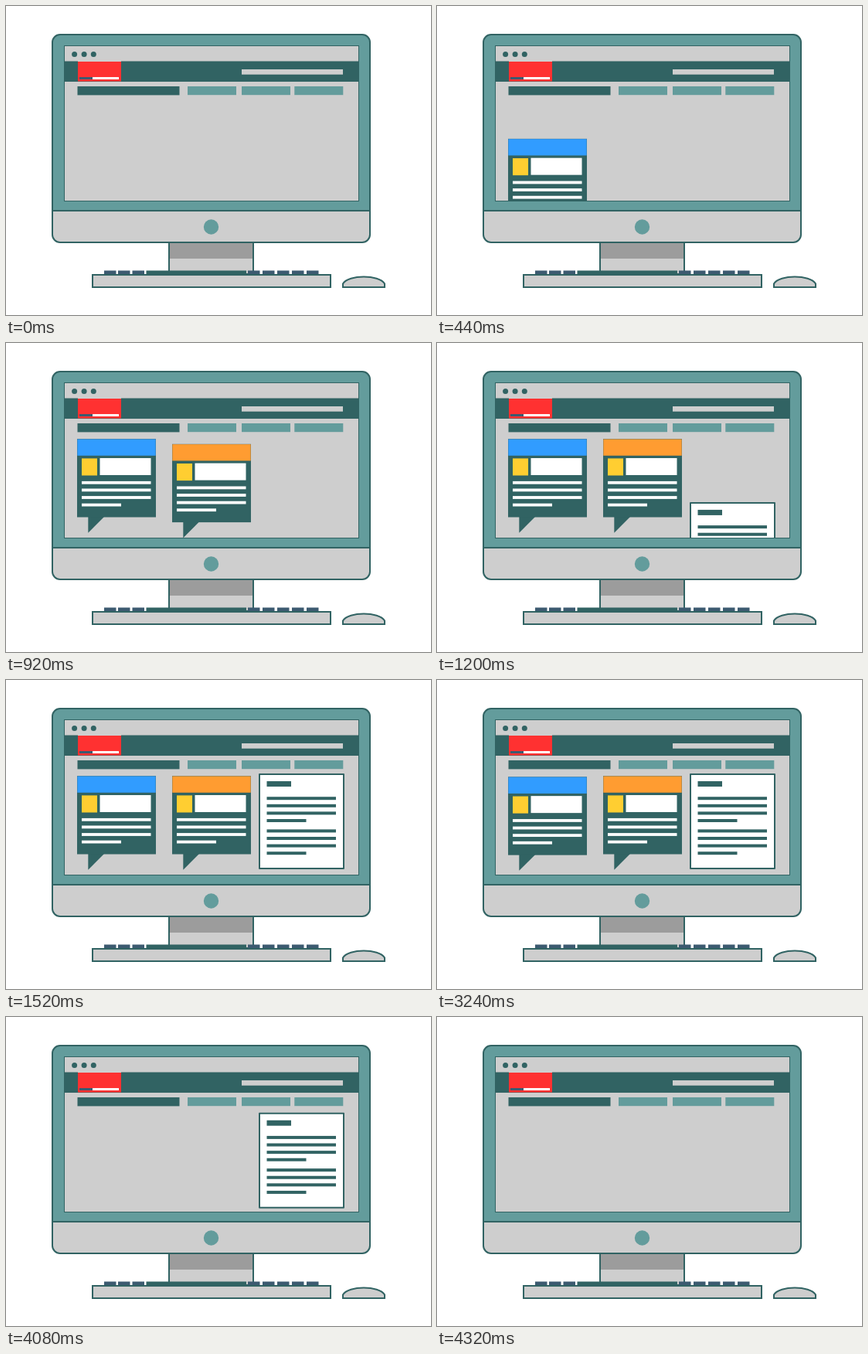
Write an HTML page with a canvas that moves like this. It is 550x400 px and loops after 4.8 s.

```html
<!DOCTYPE html>
<html lang="en">
<head>
<meta charset="utf-8">
<title>Web page on a desktop computer</title>
<style>
  html, body { margin: 0; width: 100%; height: 100%; overflow: hidden; background: #fff; }
  canvas { display: block; width: 550px; height: 400px; }
</style>
</head>
<body>
<canvas id="stage" width="550" height="400"></canvas>
<script>
const ctx = document.getElementById('stage').getContext('2d');

const DARK = '#316363', TEAL = '#639c9c', LIGHT = '#cecece', GREY = '#9c9c9c';
const RED = '#ff3131', BLUE = '#319cff', ORANGE = '#ff9c31', YELLOW = '#ffce31';
const SLATE = '#3c5a70', WHITE = '#fff';

const LOOP = 4800, STEP = 40, MOVE = 400;
const ENTER = 320, LEAVE = 3200;

// Corner-to-corner rectangle
function rect(x1, y1, x2, y2, fill) {
  ctx.fillStyle = fill;
  ctx.fillRect(x1, y1, x2 - x1, y2 - y1);
}

function outline(x1, y1, x2, y2, width = 2) {
  ctx.strokeStyle = DARK;
  ctx.lineWidth = width;
  ctx.strokeRect(x1, y1, x2 - x1, y2 - y1);
}

function disc(x, y, r, fill) {
  ctx.fillStyle = fill;
  ctx.beginPath();
  ctx.arc(x, y, r, 0, Math.PI * 2);
  ctx.fill();
}

function roundedPath(x1, y1, x2, y2, r) {
  ctx.beginPath();
  ctx.moveTo(x1 + r, y1);
  ctx.arcTo(x2, y1, x2, y2, r);
  ctx.arcTo(x2, y2, x1, y2, r);
  ctx.arcTo(x1, y2, x1, y1, r);
  ctx.arcTo(x1, y1, x2, y1, r);
  ctx.closePath();
}

function backIn(u, s) {
  return u * u * ((s + 1) * u - s);
}

// Vertical shift of a card: rises past its place and settles, later dips and leaves upward
function shift(t, index) {
  const a = (t - ENTER) / MOVE - index;
  const b = (t - LEAVE) / MOVE - index;
  if (a <= 0 || b >= 1) return null;
  if (a < 1) return 203.5 * backIn(1 - a, 0.74);
  if (b > 0) return -299 * backIn(b, 0.535);
  return 0;
}

function drawStand() {
  rect(211, 306, 320, 327, GREY);
  rect(211, 327, 320, 347, LIGHT);
  outline(211, 306, 320, 347);
}

function drawKeyboard() {
  for (const x of [127, 145, 163.5, 313, 332, 351, 370, 389]) rect(x, 342.5, x + 15.5, 348, SLATE);
  rect(181.5, 342.5, 311, 348, DARK);
  rect(112, 348, 420, 364, LIGHT);
  outline(112, 348, 420, 364);
}

function drawMouse() {
  ctx.beginPath();
  ctx.moveTo(436, 364);
  ctx.lineTo(436, 359.5);
  ctx.bezierCurveTo(443, 347.5, 483, 347.5, 490, 359.5);
  ctx.lineTo(490, 364);
  ctx.closePath();
  ctx.fillStyle = LIGHT;
  ctx.fill();
  ctx.strokeStyle = DARK;
  ctx.lineWidth = 2;
  ctx.stroke();
}

function drawMonitor() {
  ctx.save();
  roundedPath(60, 37, 471, 306, 10);
  ctx.clip();
  rect(60, 37, 471, 265, TEAL);
  rect(60, 265, 471, 306, LIGHT);
  ctx.restore();
  rect(60, 264, 471, 266, DARK);
  roundedPath(60, 37, 471, 306, 10);
  ctx.strokeStyle = DARK;
  ctx.lineWidth = 2;
  ctx.stroke();
  disc(265.5, 286, 9.7, TEAL);
}

function drawPage() {
  rect(75, 51, 457, 253, LIGHT);
  for (const x of [88.6, 101.1, 113.3]) disc(x, 62.5, 3.5, DARK);
  rect(75, 72, 457, 98, DARK);
  rect(93, 72, 149, 97.5, RED);
  rect(95, 92, 112, 95, SLATE);
  rect(112, 92, 146, 95, WHITE);
  rect(305, 82, 436, 88.7, LIGHT);
  rect(92.5, 104, 224.5, 115.4, DARK);
  for (const x of [235, 305, 373.3]) rect(x, 104, x + 63, 115.2, TEAL);
}

function drawBubble(x, color) {
  ctx.fillStyle = DARK;
  ctx.beginPath();
  ctx.moveTo(x + 14.3, 224);
  ctx.lineTo(x + 36, 224);
  ctx.lineTo(x + 14.3, 245.7);
  ctx.fill();
  rect(x, 124.2, x + 102, 225.5, DARK);
  rect(x + 0.3, 124.5, x + 101.7, 145.8, color);
  rect(x + 6, 149.4, x + 26, 171.5, YELLOW);
  rect(x + 29.5, 149, x + 95.5, 171, WHITE);
  for (let i = 0; i < 4; i++) {
    const y = 178.9 + i * 9.6;
    rect(x + 6, y, x + (i < 3 ? 95.5 : 57), y + 3.8, WHITE);
  }
}

function drawSheet() {
  rect(328, 122, 437, 244, WHITE);
  ctx.lineJoin = 'round';
  outline(328, 122, 437, 244);
  ctx.lineJoin = 'miter';
  rect(337.5, 131, 369, 138, DARK);
  for (const top of [151.2, 193.4]) {
    for (let i = 0; i < 4; i++) {
      const y = top + i * 9.6;
      rect(337.5, y, i < 3 ? 427 : 388.5, y + 4, DARK);
    }
  }
}

const cards = [
  () => drawBubble(92, BLUE),
  () => drawBubble(215, ORANGE),
  drawSheet
];

function drawCards(t) {
  ctx.save();
  ctx.beginPath();
  ctx.rect(76, 115.4, 380, 136.6);
  ctx.clip();
  cards.forEach((draw, i) => {
    const dy = shift(t, i);
    if (dy === null) return;
    ctx.save();
    ctx.translate(0, dy);
    draw();
    ctx.restore();
  });
  ctx.restore();
}

function render(t) {
  rect(0, 0, 550, 400, WHITE);
  drawStand();
  drawKeyboard();
  drawMouse();
  drawMonitor();
  drawPage();
  drawCards(t);
  outline(75.5, 51.5, 456.5, 252.5, 1);
  rect(75, 71.5, 93, 72.5, DARK);
  rect(149, 71.5, 457, 72.5, DARK);
}

const start = performance.now();

function tick() {
  const t = (performance.now() - start) % LOOP;
  render(Math.floor(t / STEP) * STEP);
  requestAnimationFrame(tick);
}

tick();
</script>
</body>
</html>
```
